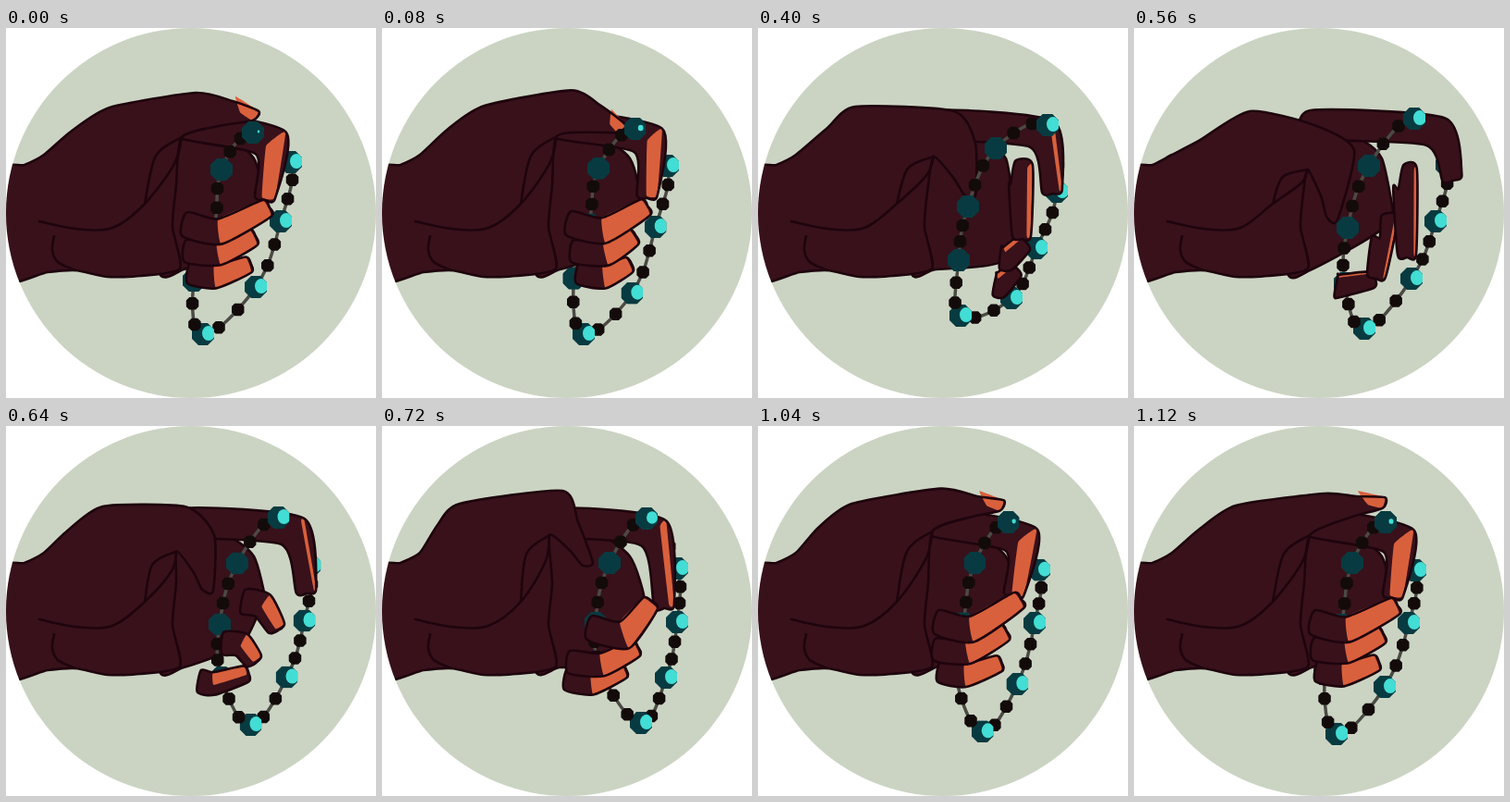
An HTML page that plays this animation: 400x400 px, repeating every 1.2 s.

```html
<!DOCTYPE html>
<html lang="en">
<head>
<meta charset="utf-8">
<title>Prayer beads</title>
<style>
html, body { margin: 0; width: 100%; height: 100%; overflow: hidden; background: #fff; }
svg { display: block; width: 100vw; height: 100vh; }
.skin { fill: #38111b; }
.lit { fill: #d9603c; }
.edge { fill: none; stroke: #1e040d; stroke-width: 2.6; stroke-linejoin: round; stroke-linecap: round; }
.cord { fill: none; stroke: #4b4a44; stroke-width: 3.5; }
</style>
</head>
<body>
<svg viewBox="0 0 400 400">
  <defs>
    <clipPath id="disc"><circle cx="200" cy="200" r="200"/></clipPath>
    <clipPath id="gem"><path d="M-5-12H5L12-5V5L5 12H-5L-12 5V-5Z"/></clipPath>
  </defs>
  <circle cx="200" cy="200" r="200" fill="#cbd4c3"/>
  <g id="scene" clip-path="url(#disc)"></g>
</svg>
<script>
const LOOP = 1200, STEP = 80;

// hand: swell, hump, thumb joint, thumb bend, thumb tip, web
// fingers: fold and tip of index, middle, ring, pinky
// lit: share of the index, then of the other fingers, that faces the light
// gems: the eight large beads, clockwise from the top
const grip = {
  at: 0, lit: '.65 1',
  hand: '70 112 112 86 205 70 245 79 270 95 190 118',
  fingers: '286 124 280 183 231 220 282 195 230 244 267 226 226 269 262 256',
  gems: '267 113 308 145 297 209 270 280 213 331 203 273 225 217 233 153'
};
const keys = [
  grip,
  {
    at: 240, lit: '.3 1',
    hand: '72 105 106 81 203 62 217 92 237 137 186 116',
    fingers: '291 116 300 177 257 217 290 192 266 245 281 225 268 269 277 256',
    gems: '287 101 311 157 293 227 271 300 228 331 216 266 222 203 236 149'
  }, {
    at: 400, lit: '.15 .22',
    hand: '75 108 105 85 212 90 235 125 229 181 190 139',
    fingers: '307 115 318 176 284 158 285 225 270 249 287 233 262 278 278 262',
    gems: '313 105 323 177 301 238 274 292 219 311 217 251 227 193 257 130'
  }, {
    at: 560, lit: '0 .12',
    hand: '70 122 125 90 195 105 238 132 214 206 188 153',
    fingers: '326 112 344 162 293 162 295 245 271 215 262 268 222 279 258 272',
    gems: '303 98 338 148 326 209 300 271 249 325 228 276 231 216 254 149'
  }, {
    at: 720, lit: '.25 1',
    hand: '60 107 84 84 195 70 212 104 222 149 181 118',
    fingers: '294 116 305 194 262 226 290 192 238 258 274 240 227 278 261 264',
    gems: '286 100 319 154 319 212 307 272 280 321 238 268 231 213 246 148'
  }, {
    at: 880, lit: '.5 1',
    hand: '56 105 84 80 182 57 235 77 251 92 186 105',
    fingers: '282 121 270 178 231 219 281 176 221 246 265 218 220 271 258 258',
    gems: '268 104 304 155 303 213 299 273 290 325 228 270 218 210 231 148'
  }, {
    ...grip, at: 1120,
    hand: '70 112 110 86 205 73 240 76 270 83 190 118',
    gems: '272 104 304 156 297 213 271 282 219 333 206 268 224 215 236 148'
  },
  { ...grip, at: LOOP }
];

const clamp01 = v => Math.max(0, Math.min(1, v));
const mix = (a, b, u) => a + (b - a) * u;
const mixPoint = (a, b, u) => [mix(a[0], b[0], u), mix(a[1], b[1], u)];
const shift = (p, v, k = 1) => [p[0] + v[0] * k, p[1] + v[1] * k];
const numbers = text => text.split(' ').map(Number);
const pairs = n => n.filter((_, i) => i % 2 === 0).map((x, i) => [x, n[2 * i + 1]]);

function direction(a, b) {
  const dx = b[0] - a[0], dy = b[1] - a[1], length = Math.hypot(dx, dy) || 1;
  return [dx / length, dy / length];
}
const normal = ([dx, dy]) => [dy, -dx];

// Softly rounded curve through the points.
function curve(pts, closed, bend = 0.11) {
  const n = pts.length;
  const at = i => closed ? pts[(i + n) % n] : pts[Math.max(0, Math.min(n - 1, i))];
  let d = 'M' + pts[0];
  for (let i = 0; i < (closed ? n : n - 1); i++) {
    const [a, b, c, e] = [at(i - 1), at(i), at(i + 1), at(i + 2)];
    d += 'C' + shift(b, [c[0] - a[0], c[1] - a[1]], bend) +
      ' ' + shift(c, [e[0] - b[0], e[1] - b[1]], -bend) + ' ' + c;
  }
  return closed ? d + 'Z' : d;
}

const scene = document.getElementById('scene');

function add(tag, attrs, parent = scene) {
  const el = document.createElementNS('http://www.w3.org/2000/svg', tag);
  for (const key in attrs) el.setAttribute(key, attrs[key]);
  return parent.appendChild(el);
}

// A skin shape with an optional lit area; build returns both outlines.
function addFlesh(build) {
  const [skin, lit, edge] = ['skin', 'lit', 'edge'].map(name => add('path', { class: name }));
  return pose => {
    const { outline, light } = build(pose);
    const d = curve(outline, true);
    skin.setAttribute('d', d);
    edge.setAttribute('d', d);
    if (light) lit.setAttribute('d', curve(light, true, 0.04));
  };
}

// Two bones with a mitred fold; light falls on the outer side past the fold.
function bentFinger(root, fold, tip, wide, narrow, share) {
  const n1 = normal(direction(root, fold)), along = direction(fold, tip), n2 = normal(along);
  const sum = shift(n1, n2), grow = 2 / Math.max(1.2, sum[0] ** 2 + sum[1] ** 2);
  const atFold = k => shift(fold, sum, grow * wide * k);
  const atTip = k => shift(tip, n2, narrow * k);
  const cut = 1 - 2 * share;
  return {
    outline: [shift(root, n1, wide), atFold(1), atTip(1), shift(atTip(0), along, 3), atTip(-1), atFold(-1), shift(root, n1, -wide)],
    light: [atFold(1), atTip(1), atTip(cut), atFold(cut)]
  };
}

const index = ({ fingers, lit }) =>
  bentFinger([190, 104], fingers[0], fingers[1], 15, 11, lit[0]);

// The inner bone comes into view as the finger curls.
const curledFinger = (slot, inner, wide, narrow) => ({ fingers, lit }) => {
  const fold = fingers[2 * slot];
  return bentFinger(shift(fold, inner, lit[1]), fold, fingers[2 * slot + 1], wide, narrow, lit[1]);
};

const palm = ({ fingers }) => ({
  outline: [[165, 112], [225, 112], [268, 141], shift(fingers[3], [-6, 0]), fingers[2], fingers[4], [192, 261], [165, 262]]
});

function hand({ hand: [swell, hump, joint, bend, tip, web] }) {
  const along = direction(bend, tip), across = normal(along);
  const top = shift(tip, across, 6), under = shift(tip, across, -6);
  const nail = clamp01((tip[0] - 240) / 25);
  return {
    outline: [[-5, 156], [20, 148], [41, 137], swell, hump, joint, bend, top, under, mixPoint(tip, web, 0.45), web,
      [184, 170], [180, 215], [188, 260], [145, 268], [110, 269], [75, 262], [45, 264], [-5, 272]],
    light: [top, under, shift(under, along, -16 * nail), shift(top, along, -30 * nail)]
  };
}

function addCreases() {
  const lines = add('path', { class: 'edge' });
  const heel = [150, 190];
  return ({ hand }) => {
    const web = hand[5];
    lines.setAttribute('d',
      curve([[36, 209], [75, 217], [115, 216], heel, shift(mixPoint(heel, web, 0.6), [8, 0]), web], false, 0.16) +
      curve([heel, shift(mixPoint(heel, web, 0.65), [-14, -5]), web], false, 0.16) +
      curve([[52, 225], [50, 240], [56, 253], [75, 262]], false, 0.16));
  };
}

// Two small beads hang between each pair of gems on a slack cord.
function strand(gems) {
  const n = gems.length, slack = 0.6;
  return Array.from({ length: 3 * n }, (_, i) => {
    const k = Math.floor(i / 3), t = (i % 3) / 3;
    const [a, b, c, d] = [-1, 0, 1, 2].map(j => gems[(k + j + n) % n]);
    const pull = t * (1 - t);
    return [0, 1].map(axis =>
      mix(b[axis], c[axis], t * t * (3 - 2 * t)) +
      slack * pull * ((1 - t) * (c[axis] - a[axis]) - t * (d[axis] - b[axis])));
  });
}

function addBead(i) {
  const group = add('g', {});
  let shine;
  if (i % 3) {
    add('path', { d: 'M-3-6H3L6-3V3L3 6H-3L-6 3V-3Z', fill: '#130b0a', stroke: '#130b0a', 'stroke-width': 1.5, 'stroke-linejoin': 'round' }, group);
  } else {
    const gem = add('g', { 'clip-path': 'url(#gem)' }, group);
    add('rect', { x: -12, y: -12, width: 24, height: 24, fill: '#073b41' }, gem);
    if (i < 15) shine = add('ellipse', { cx: 6, cy: -1, fill: '#42ddd4' }, gem);
  }
  return ([x, y]) => {
    group.setAttribute('transform', `translate(${x} ${y})`);
    if (!shine) return;
    const size = i ? 1 : clamp01((x - 262) / 28);
    shine.setAttribute('rx', 7 * size);
    shine.setAttribute('ry', 8 * size);
  };
}

function addStrand(from, to) {
  const order = Array.from({ length: to - from + 1 }, (_, i) => (from + i) % 24);
  const cord = add('path', { class: 'cord' });
  const beads = order.map(addBead);
  return ({ gems }) => {
    const all = strand(gems), pts = order.map(i => all[i]);
    cord.setAttribute('d', curve(pts, false, 0.16));
    beads.forEach((place, i) => place(pts[i]));
  };
}

// Back to front.
const layers = [
  addStrand(0, 15),
  addFlesh(palm),
  addFlesh(index),
  addFlesh(hand),
  addCreases(),
  addStrand(15, 24),
  addFlesh(curledFinger(3, [-28, -5], 12, 9)),
  addFlesh(curledFinger(2, [-36, -3], 12, 10)),
  addFlesh(curledFinger(1, [-38, -8], 13, 10))
];

function poseAt(time) {
  const k = keys.findIndex((key, i) => time >= key.at && time < keys[i + 1].at);
  const [a, b] = [keys[k], keys[k + 1]];
  const u = (time - a.at) / (b.at - a.at);
  const blend = part => {
    const end = numbers(b[part]);
    return numbers(a[part]).map((v, i) => mix(v, end[i], u));
  };
  return {
    lit: blend('lit'),
    hand: pairs(blend('hand')),
    fingers: pairs(blend('fingers')),
    gems: pairs(blend('gems'))
  };
}

const startTime = performance.now();

function render(now) {
  const elapsed = Math.max(0, now - startTime) % LOOP;
  const pose = poseAt(Math.floor(elapsed / STEP) * STEP);
  layers.forEach(draw => draw(pose));
  requestAnimationFrame(render);
}
render(startTime);
</script>
</body>
</html>
```
